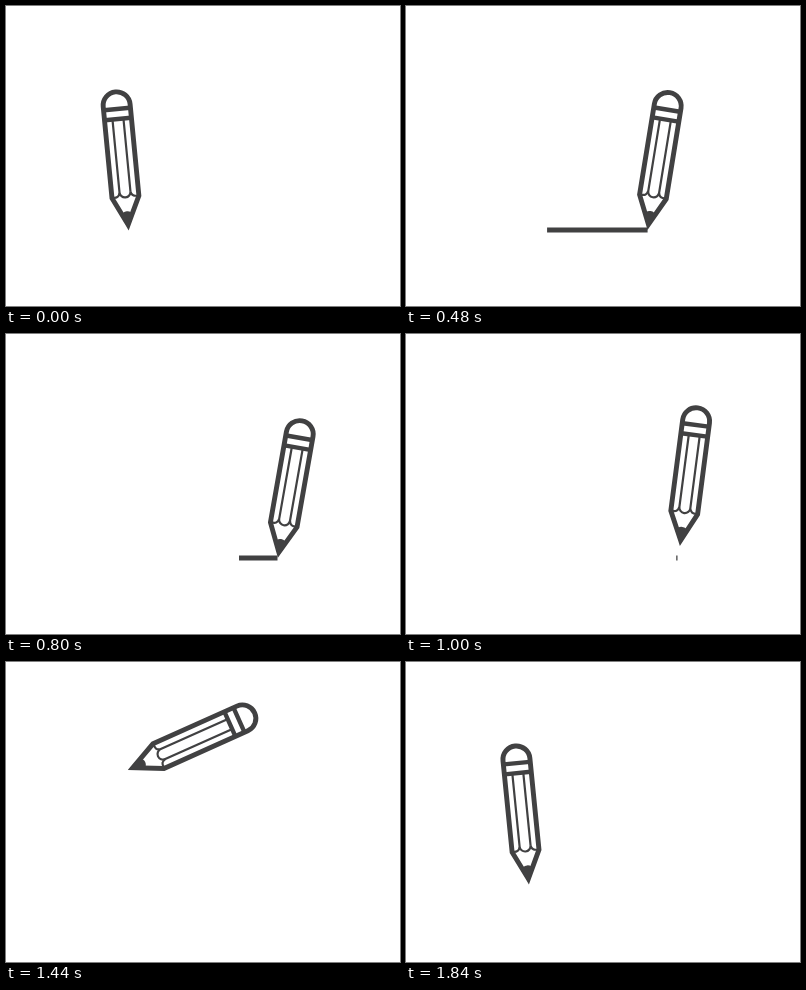
These frames come from a looping animation (394 by 300 pixels, 1880 ms). An HTML page:

```html
<!DOCTYPE html>
<html lang="en">
<head>
<meta charset="utf-8">
<title>Pencil loop</title>
<style>
  html, body { margin: 0; width: 100%; height: 100%; overflow: hidden; background: #fff; }
  svg { display: block; width: 394px; height: 300px; }
</style>
</head>
<body>
<svg viewBox="0 0 394 300" fill="none" stroke="#414142">
  <path id="line" stroke-width="5"/>
  <!-- the pencil's point is at 0,0 and it stands upright -->
  <g id="pencil">
    <path fill="#fff" stroke-width="4.9" d="M0-5L-13.5-33V-125A13.5 13.5 0 0 1 13.5-125V-33Z"/>
    <path stroke-width="4.4" d="M-13-121.3H13M-13-111.3H13"/>
    <path stroke-width="2.2" d="M-5.5-111V-38M5.5-111V-38M-13-33.5Q-6.5-32-5.5-38A5.5 5.5 0 0 0 5.5-38Q6.5-32 13-33.5"/>
    <path fill="#414142" stroke="none" d="M0-1L-6-14Q-4.5-18.5 0-18.5T6-14Z"/>
  </g>
</svg>
<script>
const LOOP = 1880;
const PIVOT = 50; // distance from the point to the turning centre
const line = document.getElementById('line');
const pencil = document.getElementById('pencil');

const part = (t, from, to) => Math.min(1, Math.max(0, (t - from) / (to - from)));
const ease = (t, from, to) => {
  const u = part(t, from, to);
  return u * u * (3 - 2 * u);
};
const easeHard = (t, from, to) => {
  const u = part(t, from, to);
  return u * u * u * (10 + u * (6 * u - 15));
};

// Smooth curve through [time, value] keys, at rest at both ends
function curve(keys, t) {
  const last = keys.length - 1;
  if (t <= keys[0][0]) return keys[0][1];
  if (t >= keys[last][0]) return keys[last][1];
  const i = keys.findIndex(k => k[0] > t) - 1;
  const slope = n => n === 0 || n === last ? 0 :
    (keys[n + 1][1] - keys[n - 1][1]) / (keys[n + 1][0] - keys[n - 1][0]);
  const [t0, a] = keys[i], [t1, b] = keys[i + 1];
  const d = t1 - t0, u = (t - t0) / d, v = 1 - u;
  return a * v * v * (1 + 2 * u) + b * u * u * (3 - 2 * u)
    + d * u * v * (slope(i) * v - slope(i + 1) * u);
}

const TOSS = 900; // writing is over, the pencil is about to fly
const tossX = [[960, 280.7], [1160, 266.5], [1300, 217], [1440, 168.2], [1680, 127.5], [1880, 117.6]];

function draw(t) {
  const angle = -5.7 + 15.7 * ease(t, -40, 560)
    - 372.5 * easeHard(t, 932, 1675) - 3.2 * ease(t, 1600, 1840);
  const tip = 122.6 + 149.4 * ease(t, 55, 655);
  const x = t < TOSS ? tip + PIVOT * Math.sin(angle * Math.PI / 180) : curve(tossX, t);
  const y = 174 - 104 * (ease(t, 913, 1323) - ease(t, 1285, 1890));
  pencil.setAttribute('transform', `translate(${x} ${y}) rotate(${angle}) translate(0 ${PIVOT})`);

  const head = Math.min(tip, 271.5);
  const tail = 122 + 149.5 * ease(t, 320, 1040);
  const drawn = t > 40 && head - tail > 0.2;
  line.setAttribute('d', drawn ? `M${tail} 224H${head}` : '');
}

const start = performance.now();
function tick() {
  draw((performance.now() - start) % LOOP);
  requestAnimationFrame(tick);
}
draw(0);
requestAnimationFrame(tick);
</script>
</body>
</html>
```
